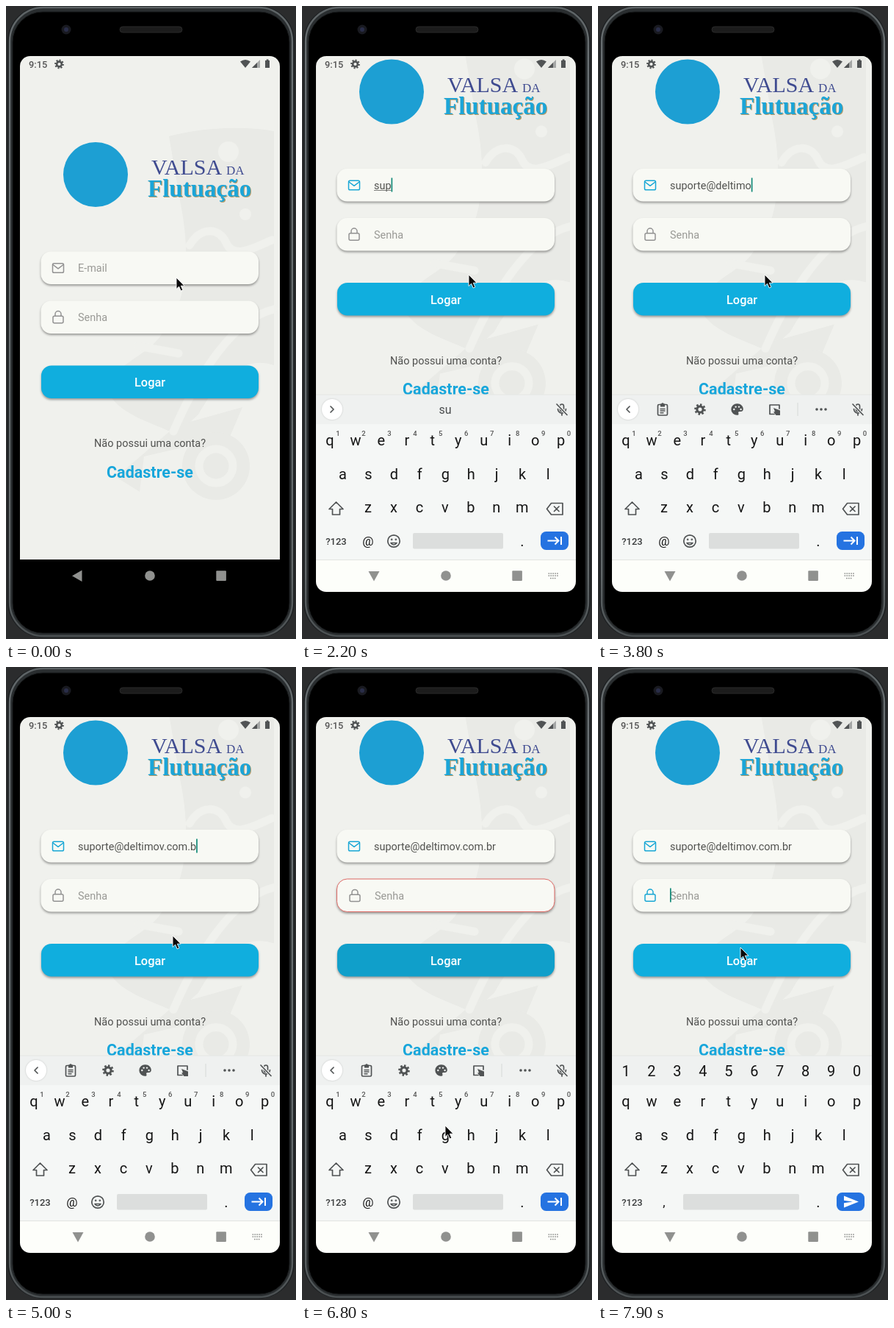
Write an HTML page that moves like this. It is 395 px wide and 860 px high and loops after 8 s.

```html
<!DOCTYPE html>
<html lang="pt-BR">
<head>
<meta charset="utf-8">
<title>Login</title>
<style>
  html, body { margin: 0; width: 100%; height: 100%; overflow: hidden; background: #2b2c2d; }
  svg { display: block; font-family: Roboto, sans-serif; }
  .mid { text-anchor: middle; }
  .card { fill: #f8f9f4; filter: drop-shadow(0 2px 1.6px rgba(0, 0, 0, .36)); }
  .input { font-size: 14.45px; fill: #999995; }
  .line { fill: none; stroke: #929292; stroke-width: 1.5; stroke-linejoin: round; stroke-linecap: round; }
  .line.on { stroke: #18a7d5; }
  .key { font-size: 20px; fill: #151515; text-anchor: middle; }
  .hint { font-size: 9.5px; fill: #555; font-weight: 500; text-anchor: middle; }
  .glyph { fill: none; stroke: #505354; stroke-width: 1.7; stroke-linejoin: round; stroke-linecap: round; }
  .solid { fill: #505354; }
  .word { font-size: 16px; fill: #4a4d4e; text-anchor: middle; }
  .brand { font-family: "Liberation Serif", serif; }
</style>
</head>
<body>
<svg id="stage" width="395" height="860" viewBox="0 0 395 860">
  <defs>
    <clipPath id="screen"><rect x="19" y="68" width="354" height="728" rx="14"/></clipPath>
    <clipPath id="page"><rect x="19" y="68" width="354" height="685"/></clipPath>
    <linearGradient id="rim" x2="0" y2="1">
      <stop offset="0" stop-color="#5c6264"/><stop offset=".08" stop-color="#6c7275"/>
      <stop offset=".9" stop-color="#63696b"/><stop offset="1" stop-color="#4b5052"/>
    </linearGradient>
    <g id="gear">
      <circle r="3.4" fill="none" stroke="#505354" stroke-width="2.6"/>
      <circle r="5.3" fill="none" stroke="#505354" stroke-width="2.2" pathLength="16" stroke-dasharray="1 1"/>
    </g>
  </defs>

  <!-- Phone body -->
  <rect x="2" y="0" width="391" height="858" rx="49" fill="#1b1e20"/>
  <rect x="5" y="2" width="385" height="854" rx="46" fill="#2a2e30" stroke="url(#rim)" stroke-width="2.4"/>
  <rect x="9" y="8" width="377" height="844" rx="41" fill="#000" stroke="#17191a"/>
  <circle cx="82" cy="32" r="6.5" fill="#191a20"/>
  <circle cx="82" cy="32" r="3" fill="#292d48"/>
  <rect x="155" y="28" width="85" height="8" rx="4" fill="#1c1c1c" stroke="#292929"/>

  <g clip-path="url(#screen)">
    <g clip-path="url(#page)">
      <rect x="19" y="68" width="354" height="685" fill="#f0f1ed"/>
      <g id="content">
        <!-- Faint skate -->
        <g fill="#e9eae6">
          <path d="M222 177C262 166 320 162 365 170V488C325 474 290 505 262 555L232 582C200 566 150 555 137 520C150 482 200 474 215 440C250 400 250 330 238 270Z"/>
          <path d="M150 640L232 570L322 545L305 585L188 612L182 660Z"/>
          <circle cx="286" cy="625" r="46"/>
        </g>
        <g fill="none" stroke="#f0f1ed" stroke-width="11" stroke-linecap="round">
          <path d="M250 325C265 300 290 300 300 322S335 330 362 318M180 462L235 472M205 425L240 438M228 578C262 500 310 425 365 412"/>
          <circle cx="286" cy="625" r="23"/>
        </g>
        <g fill="#f0f1ed">
          <circle cx="326" cy="283" r="8"/><circle cx="303" cy="198" r="14"/>
        </g>

        <circle cx="122" cy="229" r="44" fill="#1d9fd3"/>
        <g class="brand">
          <text x="198" y="229" font-size="30" fill="#3f4b90">VALSA</text>
          <text x="300" y="229" font-size="17" fill="#3f4b90">DA</text>
          <g font-size="33" font-weight="700">
            <text x="194.2" y="260.2" fill="#b39a68">Flutuação</text>
            <text x="193" y="259" fill="#1ba5d8">Flutuação</text>
          </g>
        </g>

        <rect class="card" x="47.5" y="333.5" width="296.5" height="44.5" rx="14"/>
        <g id="mail" class="line">
          <rect x="63.5" y="349.7" width="15" height="12.6" rx="1.8"/>
          <path d="M64 351.5L71 356.8L78 351.5"/>
        </g>
        <text id="email" class="input" x="98" y="361"></text>
        <path id="under" stroke="#7d7e7b" d=""/>

        <rect id="passBox" class="card" x="47.5" y="400.5" width="296.5" height="44.5" rx="14"/>
        <g id="pass">
          <g id="lock" class="line">
            <rect x="64" y="421.3" width="14" height="9.4" rx="2"/>
            <path d="M67 421V418.5A4 4 0 0 1 75 418.5V421"/>
          </g>
          <text class="input" x="98" y="428">Senha</text>
        </g>
        <rect id="caret" x="98" width="1.7" height="19" fill="#128a78"/>

        <rect id="button" class="card" x="48" y="488.5" width="296" height="44.5" rx="14"/>
        <text class="mid" x="196" y="517" font-size="16.4" font-weight="500" fill="#fff">Logar</text>
        <text class="mid" x="196" y="599" font-size="14.5" fill="#50514f">Não possui uma conta?</text>
        <text class="mid" x="196" y="640.5" font-size="21.5" font-weight="700" fill="#17a6db">Cadastre-se</text>
      </g>

      <!-- Status bar -->
      <text x="31" y="83.5" font-size="12.8" font-weight="500" fill="#555">9:15</text>
      <use href="#gear" x="72.5" y="79"/>
      <g class="solid">
        <path d="M319 75.5Q326 70.5 333 75.5L326 84Z"/>
        <path d="M346 73V84H335Z" opacity=".45"/><path d="M342 77V84H335Z"/>
        <path d="M353 74H354.7V72.5H357.5V74H359V84H353Z"/>
      </g>

      <g id="keyboard">
        <rect x="19" y="528" width="354" height="225" fill="#f5f7f6"/>
        <rect x="19" y="528" width="354" height="40" fill="#eff1f0"/>
        <path d="M19 528H373" stroke="#e4e6e4"/>
        <rect id="hot" x="63" y="528" width="50" height="40" fill="#e1e3e3"/>

        <g id="strip">
          <circle cx="41" cy="548" r="14" fill="#fff" style="filter:drop-shadow(0 .5px 1px rgba(0,0,0,.18))"/>
          <path id="chevron" class="glyph" d="M43 544L39 548L43 552"/>
          <g class="glyph">
            <path d="M351.5 548V543.5A2.5 2.5 0 0 1 356.5 543.5V548A2.5 2.5 0 0 1 351.5 548ZM348.5 547.5A5.5 5.5 0 0 0 359.5 547.5M354 553.5V556"/>
            <path d="M347 540.5L361 555.5" stroke="#eff1f0" stroke-width="4"/>
            <path d="M347 541L361 555.5"/>
          </g>
        </g>
        <g id="tools">
          <g class="glyph">
            <rect x="81.5" y="541.5" width="13" height="14.5" rx="1.5"/>
            <path d="M85 547.5H91M85 550H91M85 552.7H89" stroke-width="1.4"/>
            <path d="M247 547V542H234V554.5H240"/>
          </g>
          <path class="solid" d="M85 540.5H86.3A1.8 1.8 0 0 1 89.7 540.5H91V544.5H85Z"/>
          <use href="#gear" transform="translate(139 548) scale(1.22)"/>
          <path class="solid" d="M190 540.3A7.8 7.8 0 1 0 190 555.8C192 555.8 191.6 553.8 191.2 553C190.8 551.8 191.5 551 193 551H194.5A3.4 3.4 0 0 0 197.8 547.6C197.8 543.6 194.3 540.3 190 540.3Z"/>
          <g fill="#eff1f0">
            <circle cx="185.3" cy="548" r="1.2"/><circle cx="187.6" cy="544.6" r="1.2"/>
            <circle cx="192" cy="544.6" r="1.2"/><circle cx="194.6" cy="548" r="1.2"/>
          </g>
          <path class="solid" d="M239 546L248 549.5V556H242.5L239 551.5L241 551Z"/>
          <path d="M272 539V557" stroke="#d5d8d7"/>
          <g class="solid">
            <circle cx="298" cy="548" r="1.8"/><circle cx="304" cy="548" r="1.8"/><circle cx="310" cy="548" r="1.8"/>
          </g>
        </g>
        <g id="words">
          <text class="word" x="99" y="553.5"></text>
          <text class="word" x="195" y="553.5"></text>
          <text class="word" x="299" y="553.5"></text>
        </g>

        <g id="keys"></g>
        <g id="hints"></g>
        <g id="digits"></g>
        <g class="glyph">
          <path d="M46.5 674L56 683.5H51.5V691H41.5V683.5H37Z"/>
          <path d="M339.5 675.5H355V691H339.5L333.5 683.2ZM343.5 680L350 686.5M350 680L343.5 686.5"/>
        </g>
        <text class="mid" x="46.5" y="731.5" font-size="13" font-weight="500" fill="#3b3d3e">?123</text>
        <text id="sign" class="key" x="90" y="733" style="font-size:17px"></text>
        <g id="smile" class="glyph">
          <circle cx="125" cy="727" r="8.2"/>
          <path d="M121 729.5Q125 734.5 129 729.5Z"/>
          <circle cx="122.2" cy="724.8" r=".5"/><circle cx="127.8" cy="724.8" r=".5"/>
        </g>
        <rect id="space" y="716" height="21.5" rx="2" fill="#dcdedd"/>
        <text class="key" x="300" y="733.5">.</text>
        <rect x="325" y="714" width="38" height="25" rx="7.5" fill="#2573e1"/>
        <path id="next" fill="none" stroke="#fff" stroke-width="2" d="M334.5 726.5H349M344.5 721.5L349.5 726.5L344.5 731.5M353 721V732"/>
        <path id="send" fill="#fff" d="M335 718.5L355 726.5L335 734.5V728.3L347 726.5L335 724.7Z"/>
      </g>
    </g>

    <!-- Navigation bar -->
    <rect id="navBar" x="19" y="752" width="354" height="44"/>
    <path id="navRule" d="M19 752.5H373" stroke="#e2e4e1"/>
    <g id="nav" fill="#90918f">
      <path id="back"/>
      <circle cx="196" cy="774" r="6.8"/>
      <rect x="286.3" y="767.3" width="13.6" height="13.6" rx="1"/>
      <path id="mini" d="M335.5 771H349M335.5 774H349M338 777.5H346.5" stroke="#90918f" stroke-width="1.7" stroke-dasharray="1.7 1.2"/>
    </g>
  </g>

  <path id="mouse" d="M0 0V15.5L3.6 12.2L6.2 18L8.8 16.8L6.3 11.2H11Z" fill="#0a0a0a" stroke="#fff" stroke-width=".9"/>
</svg>

<script>
const $ = id => document.getElementById(id);
const LOOP = 8000, STEP = 100;
const FOCUS = 600, ERROR = 6700, PASS = 7500;

const address = "suporte@deltimov.com.br";
const typedAt = [19, 20, 22, 26, 27, 28, 29, 31, 32, 33, 34, 36, 37, 37, 38, 41, 43, 44, 46, 47, 48, 50, 51];

const mousePath = [
  [0, 232, 369], [100, 232, 369], [200, 227, 365], [5900, 227, 365], [6200, 213, 337],
  [6300, 209, 341], [6500, 204, 392], [6600, 203, 399], [6800, 195, 623], [6900, 195, 612],
  [7300, 182, 318], [7700, 182, 318], [7800, 200, 387], [7900, 194, 381], [8000, 194, 381]
];

function addText(parent, cls, x, y, value) {
  const el = document.createElementNS("http://www.w3.org/2000/svg", "text");
  el.setAttribute("class", cls);
  el.setAttribute("x", x);
  el.setAttribute("y", y);
  el.textContent = value;
  parent.append(el);
}

function addRow(letters, x, y, parent = $("keys"), cls = "key") {
  [...letters].forEach((c, i) => addText(parent, cls, x + i * 34.95, y, c));
}

addRow("qwertyuiop", 38, 597);
addRow("asdfghjkl", 55.5, 642.5);
addRow("zxcvbnm", 90, 688);
addRow("1234567890", 49, 583.5, $("hints"), "hint");
addRow("1234567890", 38, 555.5, $("digits"));

const set = (id, attrs) => {
  for (const k in attrs) $(id).setAttribute(k, attrs[k]);
};
const show = (id, on) => set(id, { visibility: on ? "visible" : "hidden" });
const countTyped = t => typedAt.filter(s => s * 100 <= t).length;

function mouseAt(t) {
  const i = mousePath.findIndex(p => p[0] > t);
  const [a, b] = [mousePath[i - 1], mousePath[i]];
  const k = (t - a[0]) / (b[0] - a[0]);
  return [a[1] + (b[1] - a[1]) * k, a[2] + (b[2] - a[2]) * k];
}

function drawEmail(t, n) {
  const composing = n > 0 && n < 8;
  const email = $("email");
  email.textContent = n ? address.slice(0, n) : "E-mail";
  email.style.fill = n ? "#51524f" : "";
  const width = n ? email.getComputedTextLength() : 0;
  set("under", { d: composing ? `M98 363H${98 + width}` : "" });

  const inPass = t >= PASS;
  const since = inPass ? PASS : n ? typedAt[n - 1] * 100 : FOCUS;
  const lit = t >= since && Math.floor((t - since) / 500) % 2 === 0;
  show("caret", lit && !(t >= 7400 && !inPass));
  set("caret", { x: 98 + (inPass ? 0 : width), y: inPass ? 413 : 346 });
}

function drawStrip(t, n) {
  const secure = t >= PASS, composing = n > 0 && n < 8;
  const before = countTyped(t - STEP);
  const sides = composing && before === n && n > 1;
  const [left, mid, right] = $("words").children;
  left.textContent = sides ? "super" : "";
  mid.textContent = composing ? address.slice(0, before) : "";
  right.textContent = sides ? "suporte" : "";
  set("chevron", { d: composing ? "M39 544L43 548L39 552" : "M43 544L39 548L43 552" });
  show("strip", !secure);
  show("tools", !secure && !composing);
  show("hot", t < 900);
}

function drawKeys(t) {
  const secure = t >= PASS;
  show("digits", secure);
  show("hints", !secure);
  show("smile", !secure);
  show("next", !secure);
  show("send", secure);
  $("sign").textContent = secure ? "," : "@";
  set("space", { x: secure ? 116 : 151, width: secure ? 158 : 123 });
}

function draw(t) {
  const k = Math.min(1, Math.max(0, (t - 500) / 400));
  const open = 1 - (1 - k) ** 4;
  const n = countTyped(t), up = t > 500;

  set("content", { transform: `translate(0 ${-112.5 * open})` });
  set("keyboard", { transform: `translate(0 ${225 * (1 - open)})` });
  show("navRule", up);
  show("mini", up);
  set("navBar", { fill: !up ? "#000" : t < 900 ? "#f6f7f5" : "#fdfefa" });
  set("back", { d: up ? "M90.5 768H105.5L98 781.5Z" : "M103.5 766.5V782L90 774.2Z" });

  $("mail").classList.toggle("on", t >= 500);
  $("lock").classList.toggle("on", t >= PASS);
  const error = t >= ERROR && t < PASS;
  set("passBox", { stroke: error ? "#df6c68" : "none" });
  set("pass", { transform: error ? "translate(1 .4)" : "" });
  $("button").style.fill = t >= 6600 && t < 6900 ? "#109fca" : "#10aede";

  drawEmail(t, n);
  drawStrip(t, n);
  drawKeys(t);
  set("mouse", { transform: `translate(${mouseAt(t)})` });
}

const start = performance.now();
function tick() {
  const t = (performance.now() - start) % LOOP;
  draw(Math.floor(t / STEP) * STEP);
  requestAnimationFrame(tick);
}
tick();
</script>
</body>
</html>
```
